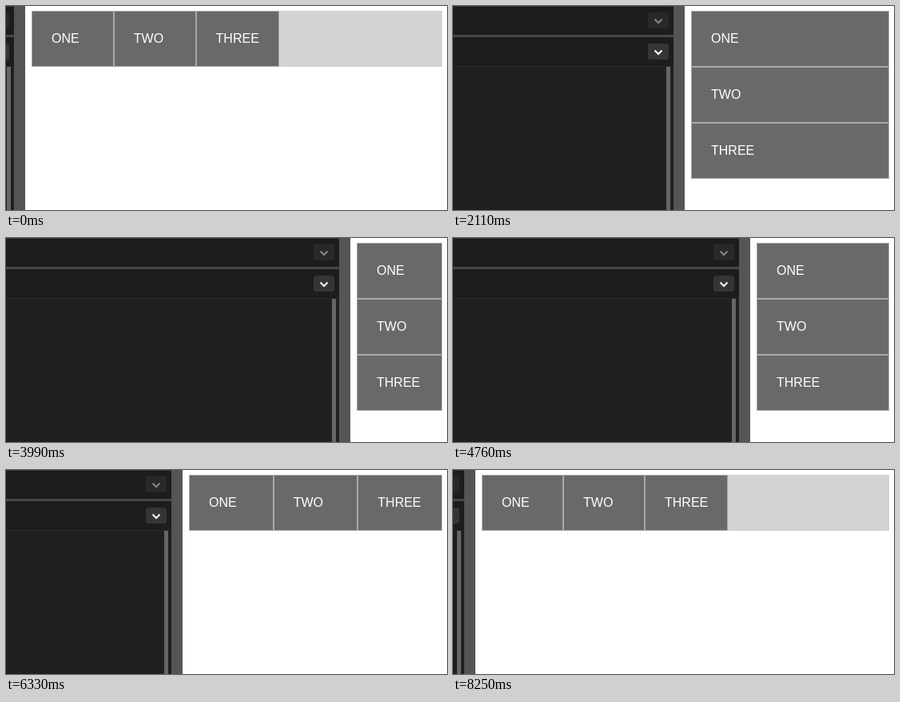
An HTML page that plays this animation: 552 px wide and 255 px high, repeating every 8310 ms.

```html
<!DOCTYPE html>
<html lang="en">
<head>
<meta charset="utf-8">
<title>Responsive menu</title>
<style>
@property --p { syntax: "<integer>"; inherits: true; initial-value: 24; }

html, body { margin: 0; width: 100%; height: 100%; overflow: hidden; background: #fff; }

.stage {
  position: relative;
  width: 552px;
  height: 255px;
  overflow: hidden;
  animation: drag 8310ms infinite;
}

/* --p is the right edge of the drag handle */
@keyframes drag {
  0%     { --p: 24;  animation-timing-function: steps(14); }
  10.34% { --p: 145; animation-timing-function: steps(5); }
  13.71% { --p: 177; animation-timing-function: steps(9); }
  19.61% { --p: 243; animation-timing-function: step-end; }
  20.93% { --p: 243; animation-timing-function: steps(19); }
  31.28% { --p: 354; animation-timing-function: steps(9); }
  35.86% { --p: 391; animation-timing-function: steps(11); }
  41.99% { --p: 432; animation-timing-function: steps(2); }
  42.96% { --p: 434; animation-timing-function: step-end; }
  47.47% { --p: 434; animation-timing-function: steps(18); }
  57.28% { --p: 372; animation-timing-function: steps(21); }
  68.11% { --p: 301; animation-timing-function: steps(15); }
  76.17% { --p: 221; animation-timing-function: steps(5); }
  78.82% { --p: 201; animation-timing-function: steps(9); }
  83.51% { --p: 156; animation-timing-function: steps(11); }
  89.53% { --p: 99;  animation-timing-function: steps(19); }
  99.27%, 100% { --p: 28; animation-timing-function: step-end; }
}

.editor {
  position: absolute;
  inset: 0 auto 0 0;
  box-sizing: border-box;
  width: calc(var(--p) * 1px);
  border-right: 14px solid #545554;
  overflow: hidden;
  background: linear-gradient(#3a3b3c 1px, #1c1d1f 1px 36px, #464747 36px 39px,
    #1c1d1f 39px 75px, #292a2c 75px 76px, #1f2022 76px);
}

.toggle {
  position: absolute;
  right: 6px;
  width: 26px;
  height: 20px;
  border-radius: 3px;
  fill: none;
  stroke-width: 2;
}
.dim { top: 8px; background: #28292b; stroke: #858687; }
.lit { top: 47px; background: #343537; stroke: #fff; }

.thumb { position: absolute; top: 76px; bottom: 0; right: 4px; width: 5px; background: #666; }

.view {
  position: absolute;
  top: 0;
  left: calc(var(--p) * 1px);
  width: calc((554 - var(--p)) * 1px);
  height: 100%;
  container-type: inline-size;
}

.menu { display: flex; margin: 6px 8px; background: #d3d3d3; }

.item {
  box-sizing: border-box;
  flex: 0 1 33.3333%;
  height: 70px;
  padding: 24px;
  border: 1px solid #a9a9a9;
  background: #696969;
  color: #fff;
  font: 16px/20px "Liberation Sans", Arial, sans-serif;
}

@container (min-width: 450px) {
  .item { flex-basis: 20%; }
}
@container (max-width: 300px) {
  .menu { flex-direction: column; }
  .item { flex: none; }
}
</style>
</head>
<body>
<div class="stage">
  <div class="editor">
    <svg class="toggle dim" viewBox="0 0 26 20"><path d="M8.5 8.5 13 13l4.500-4.500"/></svg>
    <svg class="toggle lit" viewBox="0 0 26 20"><path d="M8.5 8.500 13 13l4.500-4.500"/></svg>
    <div class="thumb"></div>
  </div>
  <div class="view">
    <div class="menu">
      <div class="item">ONE</div>
      <div class="item">TWO</div>
      <div class="item">THREE</div>
    </div>
  </div>
</div>
</body>
</html>
```
